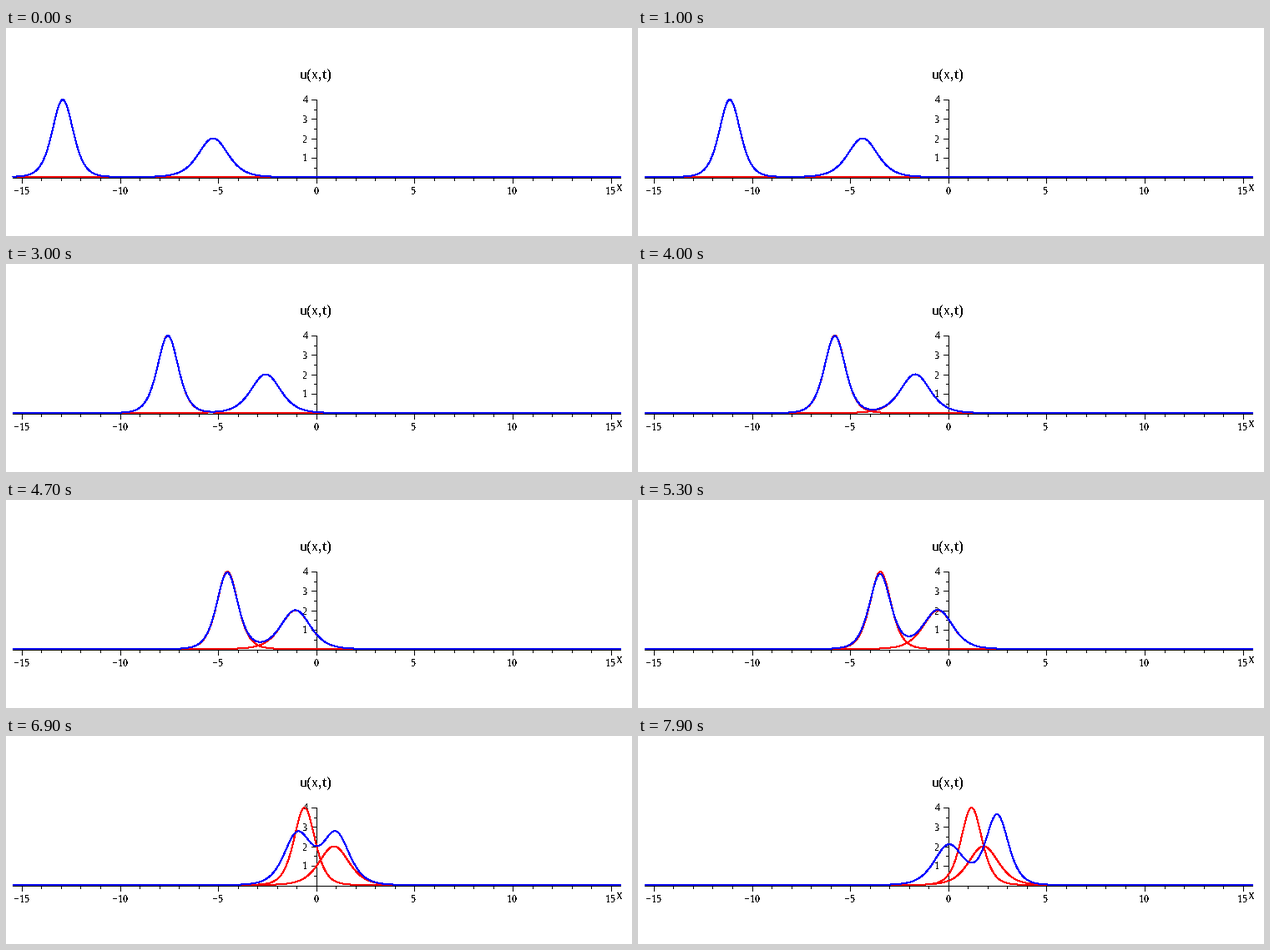
Write a matplotlib script that moves like this. It is 750x250 px and loops after 8000 ms.

```python
import numpy as np
import matplotlib.pyplot as plt
from matplotlib.animation import FuncAnimation

plt.rcParams.update({
    "font.family": "Liberation Serif",
    "text.antialiased": False,
    "text.hinting": "native",
    "text.hinting_factor": 1,
    "path.simplify": False,
})

W, H, DPI = 750, 250, 100
PT = 72 / DPI                 # points per pixel
FRAMES, INTERVAL = 80, 100
X0, Y0 = 372.3, 180           # axis origin in pixels
SX, SY = 23.53, 23.4          # pixels per unit
CURVE_Y, PEAK_Y = 179, 86     # curve heights for u = 0 and u = 4
DT, MEET = 0.0223, 69         # time step and moment of symmetry

K1, K2 = np.sqrt(2), 1.0      # KdV wave numbers, heights 2 k^2
SHIFT = np.log((K1 + K2) / (K1 - K2)) / 2

fig = plt.figure(figsize=(W / DPI, H / DPI), dpi=DPI, facecolor="white")
ax = fig.add_axes([0, 0, 1, 1])
ax.set(xlim=(0, W), ylim=(H, 0))
ax.axis("off")


def crisp(xs, ys, color, width, z):
    """Hard-edged line; every touched pixel is filled."""
    return ax.plot(xs, ys, color=color, lw=width * PT, antialiased=False,
                   snap=False, solid_capstyle="butt", zorder=z)[0]


def stroke(x1, y1, x2, y2):
    crisp([x1, x2], [y1, y2], "black", 0.8, 1)


def label(x, y, text, size, ha="center"):
    ax.text(x, y, text, fontsize=size * PT, ha=ha, va="baseline", zorder=1)


def draw_axes():
    stroke(8, Y0 + 0.5, 737, Y0 + 0.5)
    stroke(372.5, 86, 372.5, Y0)
    for n in range(-15, 16):
        x = np.floor(X0 + n * SX) + 0.5
        major = n % 5 == 0
        stroke(x, Y0, x, Y0 + (7 if major else 4))
        if major:
            label(x - 1, 200, str(n).replace("-", "\u2212"), 13)
    for n in range(1, 9):
        y = np.floor(Y0 - n / 2 * SY) + 0.5
        major = n % 2 == 0
        stroke(366 if major else 369, y, 373, y)
        if major:
            label(361.5, y + 4, str(n // 2), 13, "right")
    label(371.5, 61, "u(x,t)", 18)
    label(735, 196, "x", 18)


def soliton(x, t, k, shift):
    return 2 * k**2 / np.cosh(k * (x - 4 * k**2 * t) + shift) ** 2


def two_soliton(x, t):
    a, b = K1 * (x - 4 * K1**2 * t), K2 * (x - 4 * K2**2 * t)
    p, m = K1 + K2, K1 - K2
    f = m * np.cosh(a + b) + p * np.cosh(a - b)
    f1 = m * p * (np.sinh(a + b) + np.sinh(a - b))
    f2 = m * p * (p * np.cosh(a + b) + m * np.cosh(a - b))
    return 2 * (f2 / f - (f1 / f) ** 2)


draw_axes()
tall, low = (crisp([], [], "red", 1, 2) for _ in range(2))
joint = crisp([], [], "blue", 1, 3)
px = np.linspace(8, 737, 500)
xs = (px - X0) / SX


def update(i):
    t = (i - MEET) * DT
    waves = (soliton(xs, t, K1, SHIFT), soliton(xs, t, K2, -SHIFT),
             two_soliton(xs, t))
    for line, u in zip((tall, low, joint), waves):
        line.set_data(px, CURVE_Y - u * (CURVE_Y - PEAK_Y) / 4)
    return tall, low, joint


anim = FuncAnimation(fig, update, frames=FRAMES, interval=INTERVAL,
                     repeat=True, repeat_delay=0, blit=False)
plt.show()
```
